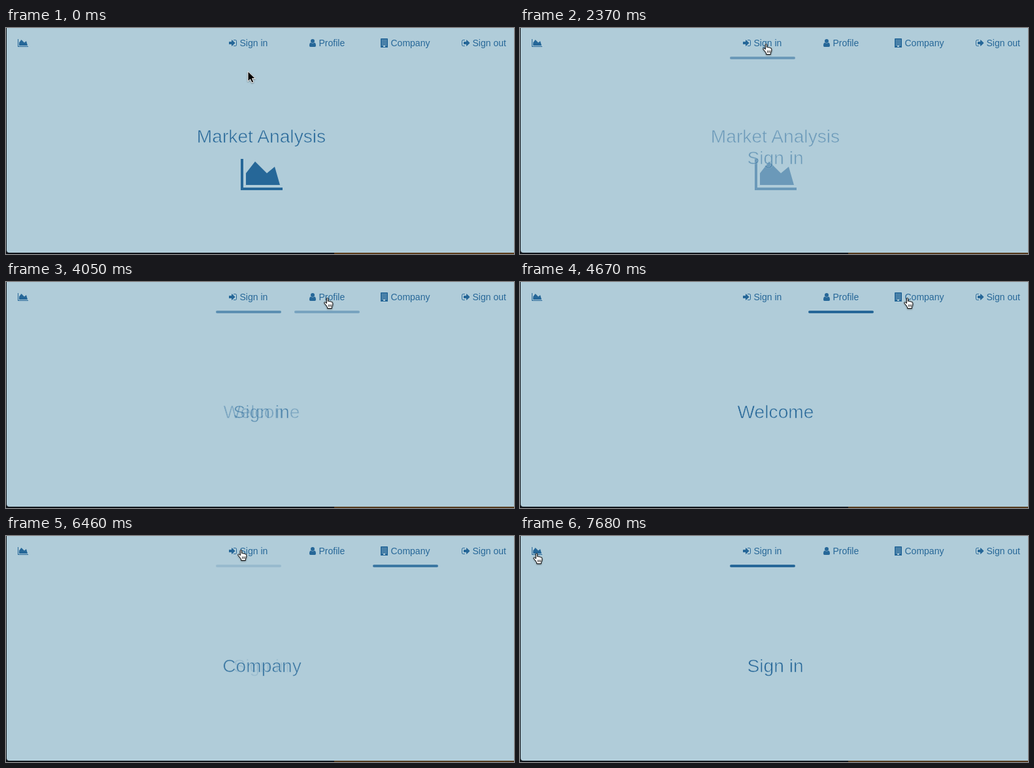
Write an HTML page that moves like this. It is 777 px wide and 347 px high and loops after 8000 ms.

```html
<!DOCTYPE html>
<html lang="en">
<head>
<meta charset="utf-8">
<title>Market Analysis</title>
<style>
  html, body { margin: 0; width: 777px; height: 347px; overflow: hidden; background: #10141a; }
  svg { display: block; font: 14px "Liberation Sans", Arial, sans-serif; fill: #266798; }
  /* A background-coloured outline thins the headings to a light weight. */
  .title { font-size: 28.2px; text-anchor: middle; stroke: #b0ccd9; stroke-width: .7px; }
</style>
</head>
<body>
<svg width="777" height="347">
  <defs>
    <path id="chart" d="M0 0H4V44H64V48H0zM52 12L60 40H8V22L22 4L40 22z"/>
    <path id="arrow" d="M0 5.5Q0 5 .5 5H4V2.7Q4.2 1.9 4.9 2.4L9.1 6.6Q9.4 7 9.1 7.4L4.9 11.6Q4.2 12.1 4 11.3V9H.5Q0 9 0 8.5z"/>
    <path id="bracket" d="M7.2 2.5H9.75A1.75 1.75 0 0 1 11.5 4.25V9.75A1.75 1.75 0 0 1 9.75 11.5H7.2" fill="none" stroke="#266798"/>
  </defs>
  <rect id="strip" x="502" y="345" width="275" height="2"/>
  <path d="M1 0H777V345H5Q1 345 1 341z" fill="#b0ccd9"/>

  <use href="#chart" transform="translate(18 17) scale(.25)"/>
  <g transform="translate(341 16)"><use href="#arrow"/><use href="#bracket"/></g>
  <g transform="translate(464 16)">
    <circle cx="5" cy="4" r="3"/>
    <path d="M2.5 6.5Q5 8.5 7.5 6.5C9.3 6.5 10 8.5 10 11Q10 13 8.4 13H1.6Q0 13 0 11C0 8.5 .7 6.5 2.5 6.5z"/>
  </g>
  <g transform="translate(573 16)">
    <rect width="11" height="14" rx=".5"/>
    <path d="M2 2.5H9M2 4.5H9M2 6.5H9M2 8.5H9M2 10.5H9" stroke="#b0ccd9" stroke-dasharray="1"/>
    <path d="M4 11H7V13H4z" fill="#b0ccd9"/>
  </g>
  <g transform="translate(697 16)">
    <use href="#arrow" x="3"/><use href="#bracket" transform="matrix(-1 0 0 1 12 0)"/>
  </g>
  <text x="357.5" y="28">Sign in</text>
  <text x="478.5" y="28">Profile</text>
  <text x="588.5" y="28">Company</text>
  <text x="713.5" y="28">Sign out</text>

  <g class="page">
    <text class="title" x="390.5" y="175.5">Market Analysis</text>
    <use href="#chart" x="359" y="201"/>
  </g>
  <g class="page">
    <text class="title" x="390.5" y="208.5">Sign in</text>
    <rect x="321" y="44" width="100" height="4" rx="2"/>
  </g>
  <g class="page">
    <text class="title" x="391" y="208.5">Welcome</text>
    <rect x="441" y="44" width="100" height="4" rx="2"/>
  </g>
  <g class="page">
    <text class="title" x="391.5" y="208.5">Company</text>
    <rect x="561" y="44" width="100" height="4" rx="2"/>
  </g>

  <g id="cursor" style="filter: drop-shadow(0 1px 1px #0006)">
    <path id="pointer" d="M0 .5V16L3.6 12.7L6 18L8.8 16.8L6.5 11.6H11.3z" fill="#000" stroke="#fff"/>
    <g id="hand" transform="translate(-5 0)" stroke="#000" fill="none">
      <path fill="#fff" d="M3.8 12L1.2 9Q.2 7.4 1.4 6.9Q2.6 6.7 3.6 8.2L4.3 8.9V1.9Q4.3 .6 5.4 .6Q6.6 .6 6.6 1.9V5.7Q7.7 4.8 8.9 6Q10.2 5.2 11.2 6.6Q13.8 6.1 13.8 8.6V11Q13.4 13.4 12.4 14.5V16.6H5.6V14.8z"/>
      <path d="M7.5 10.5V14M9.5 10.5V14M11.5 10.5V14" stroke-width=".8"/>
    </g>
  </g>
</svg>
<script>
const LOOP = 8000, CLICK = 2190;
const $ = id => document.getElementById(id);
const pages = document.querySelectorAll(".page");

const easeOut = p => 1 - (1 - p) ** 3;
const easeInOut = p => .8 * p * p * (3 - 2 * p) + .2 * p;

// Cursor moves: first step, last step, step count, end point, bend point, easing
const moves = [
  [450, 1060, 8, [376, 24], [345, 52], easeInOut],
  [3250, 3600, 5, [490.5, 24], [433, 24], easeOut],
  [4490, 4670, 3, [592, 24], [541, 24], easeInOut],
  [5660, 6190, 7, [359, 21], [475, 37], easeInOut],
  [7080, 7680, 8, [25, 26], [192, 38], easeInOut]
];
// Page fades: first step, last step, step count, page
const fades = [[CLICK, 2630, 6, 1], [3960, 4310, 5, 2], [5030, 5390, 5, 3], [6460, 6900, 6, 1]];

// Share of the steps done at time t; the first step shows at once.
function stepped(t, start, end, count) {
  const done = Math.floor((t - start) / (end - start) * (count - 1) + 1e-6) + 1;
  return Math.max(0, Math.min(count, done)) / count;
}

function cursorAt(t) {
  let pos = [370, 66];
  for (const [start, end, count, to, bend, ease] of moves) {
    if (t < start) break;
    const p = ease(stepped(t, start, end, count)), q = 1 - p;
    pos = pos.map((from, i) => q * q * from + 2 * p * q * bend[i] + p * p * to[i]);
  }
  return pos;
}

function draw(t) {
  let alpha = [1, 0, 0, 0];
  for (const [start, end, count, page] of fades) {
    if (t < start) break;
    const p = stepped(t, start, end, count);
    alpha = alpha.map((a, i) => a * (1 - p) + (i === page ? p : 0));
  }
  pages.forEach((page, i) => page.style.opacity = alpha[i]);

  const [x, y] = cursorAt(t);
  const overTab = x >= 321 && (x - 321) % 120 <= 100;
  const linked = t >= CLICK && (x < 40 || overTab);
  $("cursor").setAttribute("transform", `translate(${Math.round(x)} ${Math.round(y)})`);
  $("pointer").style.display = linked ? "none" : "";
  $("hand").style.display = linked ? "" : "none";
  $("strip").style.fill = t < 1310 ? "#5c3d1c" : "#533a1e";
}

const begin = performance.now();
function tick() {
  draw((performance.now() - begin) % LOOP);
  requestAnimationFrame(tick);
}
tick();
</script>
</body>
</html>
```
